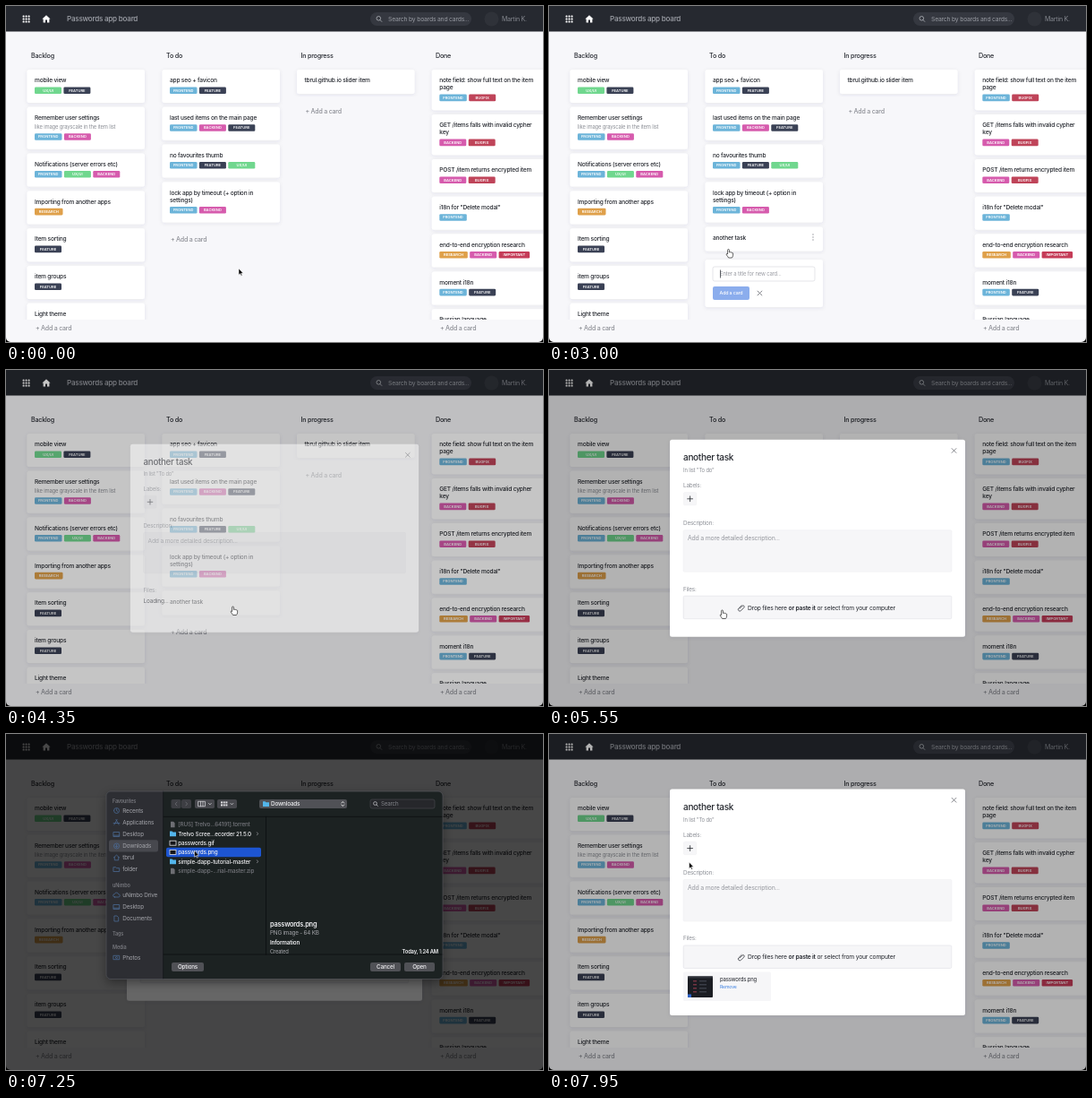
Animation, 600 px wide and 375 px high, one loop 8 s. Source, as an HTML page:

```html
<!DOCTYPE html>
<html lang="en">
<head>
<meta charset="utf-8">
<title>Board</title>
<style>
html, body { margin: 0; width: 100%; height: 100%; overflow: hidden; background: #f7f7fa; }
svg { display: block; width: 100%; height: 100%; }
text { font-family: Inter, "Open Sans", sans-serif; letter-spacing: -.03em; white-space: pre; }
.tag { letter-spacing: 0; }
</style>
</head>
<body>
<svg id="stage" viewBox="0 0 600 375">
  <defs>
    <filter id="soft" x="-10%" y="-10%" width="120%" height="120%">
      <feDropShadow dx="0" dy="1.2" stdDeviation="2" flood-color="#30344a" flood-opacity=".09"/>
    </filter>
    <filter id="deep" x="-15%" y="-15%" width="130%" height="140%">
      <feDropShadow dx="0" dy="4" stdDeviation="6" flood-opacity=".4"/>
    </filter>
    <clipPath id="lists"><rect y="28" width="600" height="322"/></clipPath>
  </defs>
</svg>
<script>
const LOOP = 8000;
const INK = '#23262d', GRAY = '#8c8f96';
const stage = document.getElementById('stage');

// ---- markup helpers; text y is the middle of the line ----
const text = (x, y, s, size, fill = INK, weight = 400, more = '') =>
  `<text x="${x}" y="${y + size * .35}" font-size="${size}" fill="${fill}" font-weight="${weight}" ${more}>${s}</text>`;
const rect = (x, y, w, h, fill, r = 0, more = '') =>
  `<rect x="${x}" y="${y}" width="${w}" height="${h}" rx="${r}" fill="${fill}" ${more}/>`;
const line = (d, stroke, w = .6, more = '') =>
  `<path d="${d}" fill="none" stroke="${stroke}" stroke-width="${w}" stroke-linecap="round" ${more}/>`;
const dot = (x, y, r, fill) => `<circle cx="${x}" cy="${y}" r="${r}" fill="${fill}"/>`;
const group = (id, body, more = '') => `<g id="${id}" ${more}>${body}</g>`;
const cross = (x, y, r, color) => line(`M${x - r} ${y - r}l${2 * r} ${2 * r}m0 ${-2 * r}l${-2 * r} ${2 * r}`, color, .8);

// ---- board ----
const TAGS = {
  F: ['FRONTEND', '#6cb4d9', 30.5], T: ['FEATURE', '#3a4155', 30], B: ['BACKEND', '#d65bad', 30],
  U: ['UX/UI', '#70d78e', 30], R: ['RESEARCH', '#dfa04a', 31.5], X: ['BUGFIX', '#bf4459', 30],
  I: ['IMPORTANT', '#c53c58', 34.5]
};

function tags(x, y, keys) {
  return [...keys].map(k => {
    const [name, color, w] = TAGS[k];
    const out = rect(x, y - 3.8, w, 7.6, color, 1.3) +
      text(x + w / 2, y, name, 4.1, '#fff', 600, 'class="tag" text-anchor="middle"');
    x += w + 2.4;
    return out;
  }).join('');
}

// a card is [title lines, tag keys, note]
function column(x, cards) {
  let y = 71, out = '';
  for (const [title, keys, note] of cards) {
    const lines = title.split('|');
    const extra = (lines.length - 1) * 8.2 + (note ? 10 : 0);
    const h = (keys ? 37 : 27) + extra;
    out += rect(x, y, 131.5, h, '#fff', 2.5, 'filter="url(#soft)"');
    lines.forEach((s, i) => out += text(x + 8.5, y + 11.8 + i * 8.2, s, 6.6, INK, 500));
    if (note) out += text(x + 8.5, y + 22, note, 5.9, GRAY);
    if (keys) out += tags(x + 8.5, y + 23.2 + extra, keys);
    y += h + 4.8;
  }
  return out;
}

const addLink = (x, y, id = '') => text(x, y, '+ Add a card', 7, '#8a8c93', 500, id && `id="${id}"`);
const heading = (x, s) => text(x, 55, s, 7.15, INK, 500);

function header() {
  let dots = '';
  for (let i = 0; i < 9; i++) dots += rect(18.6 + i % 3 * 3, 10.6 + Math.floor(i / 3) * 3, 2, 2, '#fff', .6);
  return rect(0, 0, 600, 28.5, '#262930') + dots +
    '<path d="M45 10.2l-4.6 4.2h1.2v4h2.4v-2.8h2v2.8h2.4v-4h1.2z" fill="#fff"/>' +
    text(68, 14.5, 'Passwords app board', 8.1, '#a0a3aa', 500) +
    rect(407, 7, 113, 15, '#353840', 7.5) +
    '<circle cx="416.3" cy="13.8" r="2.3" fill="none" stroke="#b3b6bc" stroke-width=".8"/>' +
    line('M418 15.6l1.8 1.8', '#b3b6bc', .8) +
    text(427, 14.5, 'Search by boards and cards...', 6.8, '#989ba2') +
    dot(542.5, 14.5, 8, '#2f3239') + text(554, 14.5, 'Martin K.', 7, '#868990');
}

const board = rect(0, 0, 600, 375, '#f7f7fa') +
  heading(28, 'Backlog') + heading(179, 'To do') + heading(329.5, 'In progress') + heading(480, 'Done') +
  '<g clip-path="url(#lists)">' +
  column(23.5, [
    ['mobile view', 'UT'], ['Remember user settings', 'FB', 'like image grayscale in the item list'],
    ['Notifications (server errors etc)', 'FUB'], ['Importing from another apps', 'R'],
    ['Item sorting', 'T'], ['item groups', 'T'], ['Light theme', 'T']]) +
  column(174.5, [
    ['app seo + favicon', 'FT'], ['last used items on the main page', 'FBT'],
    ['no favourites thumb', 'FTU'], ['lock app by timeout (+ option in|settings)', 'FB']]) +
  column(325, [['tbrul.github.io slider item', '']]) +
  column(475.8, [
    ['note field: show full text on the item|page', 'FX'], ['GET /items falls with invalid cypher|key', 'BX'],
    ['POST /item returns encrypted item', 'BX'], ['i18n for "Delete modal"', 'F'],
    ['end-to-end encryption research', 'RBI'], ['moment i18n', 'FT'], ['Russian language', 'T']]) +
  '</g>' +
  addLink(33, 359.5) + addLink(485, 359.5) + addLink(334.5, 117.5) + addLink(184, 261, 'add') +
  group('task',
    rect(174.5, 246.4, 131.5, 27, '#fff', 2.5, 'filter="url(#soft)"') +
    text(183, 258.2, 'another task', 6.6, INK, 500) +
    group('more', [255, 258, 261].map(y => dot(295, y, .7, GRAY)).join(''))) +
  group('form',
    rect(174.5, 283, 131.5, 53, '#fff', 2.5, 'filter="url(#soft)"') +
    rect(183, 291, 114, 16, '#fff', 2, 'stroke="#d3d5db" stroke-width=".6"') +
    text(191, 299, '', 5.95, INK, 400, 'id="entry"') +
    rect(191, 294.5, .7, 9, INK, 0, 'id="caret"') +
    rect(183, 313, 41, 15, '#5b8be6', 2, 'id="save"') +
    text(203.5, 320.5, 'Add a card', 5.3, '#fff', 500, 'text-anchor="middle"') +
    cross(235.5, 320.5, 2.4, '#666970'));

// ---- card modal, drawn from its own top edge ----
const modal = group('modal',
  rect(135, 0, 330, 220, '#fff', 2.5, 'id="sheet" filter="url(#soft)"') +
  text(150, 20, 'another task', 10, INK, 500) +
  text(150, 34, 'In list "To do"', 5.9, GRAY) +
  cross(452.5, 12.3, 2.4, '#666970') +
  text(150, 51, 'Labels:', 6.35, GRAY) +
  rect(150.4, 58.8, 14.4, 14.4, '#f6f6f8', 1.5, 'stroke="#ececf0" stroke-width=".4"') +
  line('M157.6 63.2v5.8m-2.9-2.9h5.8', INK, .8) +
  text(150, 93, 'Description:', 6.35, GRAY) +
  rect(150, 101, 300, 46.5, '#f6f6f8', 1.5, 'stroke="#ececf0" stroke-width=".5"') +
  text(155, 110.3, 'Add a more detailed description...', 6.9, '#96989f') +
  text(150, 166.7, 'Files:', 6.35, GRAY) +
  text(150, 179.3, 'Loading...', 6.6, INK, 400, 'id="loading"') +
  group('drop',
    rect(150.2, 174.5, 299.6, 25.5, '#f6f6f8', 1.5, 'stroke="#dfe0e6" stroke-width=".6"') +
    line('M213 188.6l3-3q1.1-.9 1.9 0t0 1.9l-3.4 3.4q-1.3 1.2-2.6 0t0-2.6l3.3-3.3', INK, .7) +
    text(222, 187.5, 'Drop files here <tspan font-weight="600">or paste it</tspan> or select from your computer', 6.75)) +
  group('file',
    rect(150, 204, 98, 32.5, '#f6f6f8', 1.5) +
    rect(155, 209, 28, 23.5, '#1b1d23', 1) +
    rect(155, 209, 28, 2, '#30333b') + rect(155, 229, 4, 3.5, '#2d62c8') +
    [0, 1, 2, 3].map(i => rect(161, 214 + i * 4, 4, .8, '#c0475c') + rect(168, 214 + i * 4, 8, .8, '#565a66')).join('') +
    text(191, 212.7, 'passwords.png', 6, INK) + text(191, 221, 'Remove', 5.2, '#3a7fe0')));

// ---- file picker, drawn from its own top edge ----
const PALE = '#dedee2', DIM = '#75767c';
const folder = (x, y, fill = '#53b5ea') =>
  `<path d="M${x} ${y - 2.8}h2.6l.9 1h3.5v4.8h-7z" fill="${fill}"/>`;
const doc = (x, y) => `<path d="M${x + 1} ${y - 3.3}h3l1.6 1.6v5h-4.6z" fill="#6d6e73"/>`;
const image = (x, y) => rect(x, y - 2.5, 7, 5, '#15161a', 0, 'stroke="#e4e4e8" stroke-width=".8"');
const chevron = (x, y, s = 1.2, more = '') => line(`M${x} ${y - 1.6 * s}l${s * 1.2} ${1.6 * s}l${-s * 1.2} ${1.6 * s}`, '#a6a7ac', .7, more);
const down = x => line(`M${x} 13.4l1.4 1.5l1.4-1.5`, PALE, .7);

const ICONS = {
  clock: 'M-3 0a3 3 0 1 0 6 0a3 3 0 1 0-6 0M0-1.8V0l1.3.8',
  app: 'M-2.6 2.6L.6-3M2.6 2.6L-.6-3M-3.4 1h6.8',
  screen: 'M-3.2-2.5h6.4v5h-6.4zM-3.2 1.2h6.4',
  arrow: 'M-3 0a3 3 0 1 0 6 0a3 3 0 1 0-6 0M0-1.7v3M-1.2.2L0 1.5L1.2.2',
  home: 'M-3.2 0L0-2.9L3.2 0M-2.2-.6v3.4h4.4v-3.4',
  folder: 'M-3.2-2.3h2.4l.8 1h3.2v3.8h-6.4z',
  cloud: 'M-2 2h4a1.6 1.6 0 0 0 .2-3.2a2.3 2.3 0 0 0-4.4-.2a1.7 1.7 0 0 0 .2 3.4z',
  page: 'M-2.2-3h2.7l1.7 1.7v4.3h-4.4z',
  photo: 'M-3.2-2h6.4v4.4h-6.4zM-1.1.2a1.1 1.1 0 1 0 2.2 0a1.1 1.1 0 1 0-2.2 0'
};
const place = ([y, icon, name]) =>
  line(ICONS[icon], 'currentColor', .8, `transform="translate(123.5 ${y})"`) +
  text(130.3, y, name, 6.4, 'inherit', 400);
const section = (y, s) => text(119, y, s, 5.5, DIM, 600);
const row = ([y, icon, name, fill = '#eeeef1', open]) =>
  icon(183, y) + text(192.3, y, name, 6.35, fill, 500) + (open ? chevron(280.5, y, .9) : '');
const button = (x, w, s, id) =>
  group(id, rect(x, 191, w, 10, '#505156', 2) +
    text(x + w / 2, 196, s, 6.3, '#f0f0f3', 500, 'text-anchor="middle"'));

const picker = group('picker',
  rect(112, 0, 376, 209.5, '#1f2024', 5, 'filter="url(#deep)"') +
  '<path d="M117 0h58.5v209.5H117a5 5 0 0 1-5-5V5a5 5 0 0 1 5-5z" fill="#2d2e33"/>' +
  section(11, 'Favourites') + section(105, 'uNimbo') + section(159.5, 'Tags') + section(174.5, 'Media') +
  rect(115, 54.3, 55, 13.2, '#47484e', 2.5) +
  group('places', [
    [21.5, 'clock', 'Recents'], [34.5, 'app', 'Applications'], [48, 'screen', 'Desktop'],
    [61, 'arrow', 'Downloads'], [74, 'home', 'tbrul'], [87, 'folder', 'folder'],
    [116, 'cloud', 'uNimbo Drive'], [129, 'screen', 'Desktop'], [142, 'page', 'Documents'],
    [185.3, 'photo', 'Photos']].map(place).join('')) +
  rect(184.5, 9, 11, 10, '#3d3e43', 1.8) + rect(196, 9, 11, 10, '#3d3e43', 1.8) +
  line('M191 12l-1.8 2l1.8 2', DIM, .7) + line('M200.8 12l1.8 2l-1.8 2', DIM, .7) +
  rect(211, 9, 22, 10, '#47484d', 1.8) + rect(236, 9, 22, 10, '#47484d', 1.8) +
  line('M215 11.3h7.5v5.4h-7.5zM217.5 11.3v5.4M220 11.3v5.4', PALE, .7) + down(226.5) +
  [0, 1, 2, 3, 4, 5].map(i => rect(240 + i % 3 * 2.7, 11.4 + (i > 2) * 3, 2, 2, PALE)).join('') + down(251) +
  rect(283, 9, 98, 10, '#505156', 2) + folder(287, 14) + text(296, 14, 'Downloads', 6.4, '#f0f0f3', 500) +
  rect(372.2, 9.8, 8.2, 8.4, '#2468d8', 1.8, 'id="knob"') +
  line('M374.9 13l1.4-1.5l1.4 1.5m0 2l-1.4 1.5l-1.4-1.5', '#fff', .8) +
  rect(407, 9, 72, 10, '#26272b', 2, 'stroke="#4b4c51" stroke-width=".6"') +
  '<circle cx="412.5" cy="13.5" r="1.9" fill="none" stroke="#d0d0d4" stroke-width=".7"/>' + line('M414 15l1.4 1.4', '#d0d0d4', .7) +
  text(419, 14, 'Search', 6.2, '#85868c') +
  line('M176 28.3H488M176 182H488M290.5 28.3V182', '#0c0d10', .8) +
  line('M175.7 0V209.5', '#131418', .6) +
  rect(179, 62.8, 106, 10.4, '#1d55d2', 2, 'id="pick"') +
  [
    [37, doc, '[RUS] Trelvo...64191].torrent', DIM], [47.3, folder, 'Trelvo Scree...ecorder 21.5.0', undefined, 1],
    [57.7, image, 'passwords.gif'], [68, image, 'passwords.png'],
    [78.3, folder, 'simple-dapp-tutorial-master', undefined, 1],
    [89, doc, 'simple-dapp-...rial-master.zip', DIM]].map(row).join('') +
  group('info',
    text(295, 148, 'passwords.png', 7.4, '#f0f0f3', 600) + text(295, 157.5, 'PNG image - 64 KB', 6.3, '#a6a7ac') +
    text(295, 169, 'Information', 6.3, '#f0f0f3', 600) + text(295, 179, 'Created', 5.8, '#a6a7ac') +
    text(483, 179, 'Today, 1:24 AM', 5.8, '#f0f0f3', 600, 'text-anchor="end"')) +
  button(185, 36, 'Options', 'options') + button(407, 34, 'Cancel', 'cancel') + button(445, 34, 'Open', 'open') +
  rect(112, 0, 376, 209.5, 'none', 5, 'stroke="#5c5d63" stroke-width=".6"'));

const pointer =
  group('arrow', '<path d="M0 0V7.2L1.7 5.7L2.8 8.2L3.9 7.7L2.8 5.3H5Z" fill="#000" stroke="#fff" stroke-width=".55"/>') +
  group('hand', '<path d="M-.9.9a.9.9 0 0 1 1.8 0V3.4q.9-.5 1.6.1q.8-.3 1.4.3q.9-.1 1.2.6V6.8q-.3 1.8-1.2 2.7H.1Q-.8 8-2.2 6.2-2.6 5.2-1.7 5-1.2 5-.9 5.5Z" fill="#fff" stroke="#111" stroke-width=".65" stroke-linejoin="round"/>');

stage.insertAdjacentHTML('beforeend',
  board + header() + rect(0, 0, 600, 375, '#000', 0, 'id="shade"') + modal +
  rect(0, 0, 600, 375, '#000', 0, 'id="dim"') + picker +
  '<path d="M0 370a5 5 0 0 0 5 5H0zM600 370a5 5 0 0 1-5 5h5z" fill="#000"/>' + pointer);

// ---- motion ----
const ui = {};
stage.querySelectorAll('[id]').forEach(e => ui[e.id] = e);
const set = (id, name, v) => ui[id].setAttribute(name, v);
const show = (id, on) => set(id, 'visibility', on ? 'inherit' : 'hidden');
const move = (id, x, y, scale = 1) => set(id, 'transform', `translate(${x} ${y}) scale(${scale})`);
const part = (t, from, span) => Math.min(1, Math.max(0, (t - from) / span));
const easeOut = p => 1 - (1 - p) ** 2;
const easeBoth = p => p * p * (3 - 2 * p);

const AT = { form: 950, type: 1250, add: 2650, close: 3500, modal: 4200, loaded: 4450,
  picker: 6050, select: 6650, done: 7350, upload: 7750 };
const TITLE = 'another task';
const TRACK = [ // time, x, y
  [200, 260, 293], [800, 204, 261], [2600, 204, 261], [3000, 200.5, 271.5], [3400, 235, 319],
  [3550, 235, 319], [4050, 253.5, 264], [4600, 253.5, 264], [5400, 193.5, 268], [5950, 193.5, 268],
  [6240, 209.5, 122], [6270, 209.5, 122], [6450, 210.5, 130], [7400, 210.5, 130], [7850, 156.5, 143]];

function pointerAt(t) {
  const i = TRACK.findIndex(k => k[0] > t);
  if (i === 0) return TRACK[0].slice(1);
  if (i < 0) return TRACK[TRACK.length - 1].slice(1);
  const [t0, x0, y0] = TRACK[i - 1], [t1, x1, y1] = TRACK[i];
  const p = easeBoth((t - t0) / (t1 - t0));
  return [x0 + (x1 - x0) * p, y0 + (y1 - y0) * p];
}

function draw(t) {
  const added = t >= AT.add, formOn = t >= AT.form && t < AT.close;
  const [x, y] = pointerAt(t);
  const inside = (l, top, r, b) => x >= l && x <= r && y >= top && y <= b;
  const overTask = added && t < AT.modal && inside(174, 246, 306, 273.5);

  show('add', !formOn);
  move('add', 0, added ? 32 : 0);
  show('task', added);
  show('more', overTask);
  show('form', formOn);
  move('form', 0, added ? 0 : -32);

  const typed = added ? '' : TITLE.slice(0, Math.floor(part(t, AT.type, 1150) * TITLE.length));
  ui.entry.textContent = typed || 'Enter a title for new card...';
  set('entry', 'fill', typed ? INK : '#9a9ca3');
  set('caret', 'x', 191 + (typed ? ui.entry.getComputedTextLength() + .4 : 0));
  show('caret', formOn && t % 1000 < 500);
  set('save', 'opacity', typed ? 1 : .7);

  const inn = part(t, AT.modal, 300), scale = .952 + .048 * inn;
  const loaded = t >= AT.loaded, uploaded = t >= AT.upload;
  const h = uploaded ? 252.5 : loaded ? 220 : 215;
  set('shade', 'opacity', .3 * easeOut(inn));
  set('modal', 'opacity', inn);
  move('modal', 300 * (1 - scale), 187.7 - h * scale / 2, scale);
  set('sheet', 'height', h);
  show('loading', !loaded);
  show('drop', loaded);
  show('file', uploaded);

  const sheet = easeOut(part(t, AT.picker, 350)), out = easeBoth(part(t, AT.done, 250));
  const chosen = t >= AT.select;
  set('dim', 'opacity', .6 * sheet * (1 - out));
  set('picker', 'opacity', Math.min(1, part(t, AT.picker, 150)) * (1 - out));
  move('picker', 0, 64 - 46 * (1 - sheet) - 30 * out);
  show('pick', chosen);
  show('info', chosen);
  set('open', 'opacity', chosen ? 1 : .4);
  set('knob', 'fill', chosen ? '#505156' : '#2468d8');
  set('places', 'color', chosen ? '#4b6a94' : '#4390f5');
  set('places', 'fill', chosen ? '#a3a4aa' : PALE);

  const hand = t < AT.modal
    ? overTask || (formOn ? inside(183, 281, 224, 297) && !added || added && inside(230, 314, 242, 327)
      : !added && inside(182, 255, 228, 267))
    : t < AT.picker && inside(150, 252, 450, 279);
  const hidden = t > AT.type && t < AT.add - 100;
  show('hand', hand && !hidden);
  show('arrow', !hand && !hidden);
  move(hand ? 'hand' : 'arrow', x, y);
}

// fill is inherited by the sidebar names
ui.places.querySelectorAll('text').forEach(e => e.removeAttribute('fill'));

const start = performance.now();
function frame(now) {
  draw(Math.max(0, now - start) % LOOP);
  requestAnimationFrame(frame);
}
draw(0);
requestAnimationFrame(frame);
</script>
</body>
</html>
```
